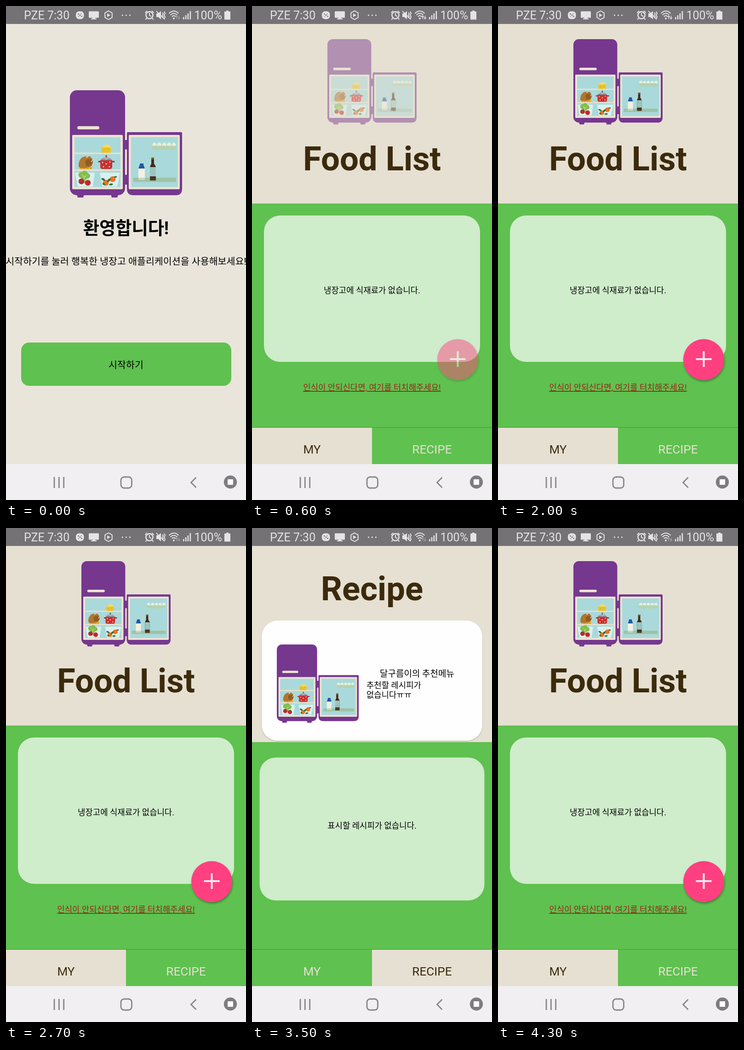
An HTML page for the animation above (5 s loop, 522 by 1073 pixels).

```html
<!DOCTYPE html>
<html lang="ko">
<head>
<meta charset="utf-8">
<title>Food List</title>
<style>
html, body { margin: 0; width: 100%; height: 100%; overflow: hidden; background: #e9e5da; }
svg { display: block; width: 522px; height: 1073px; }
text { font-family: Roboto, "Noto Sans CJK KR", "Noto Sans CJK", sans-serif; font-size: 17.8px; }
.mid { text-anchor: middle; }
.h1 { font-size: 72.5px; font-weight: 700; fill: #3b2a0c; }
.tab { font-size: 26.1px; }
.bar { font-size: 25px; fill: #e4e3e5; }
.link { fill: #96261a; text-decoration: underline; text-decoration-thickness: 1px; }

.welcome, .list, .recipe, .fade, .arrows { animation: 5s step-end infinite; }
.welcome { animation-name: welcome; }
.list { animation-name: list; }
.recipe { animation-name: recipe; }
.list .fade { animation-name: listFade; }
.recipe .fade { animation-name: recipeFade; }
.arrows { animation-name: arrows; }
@keyframes welcome { 0% { visibility: visible } 10%, 100% { visibility: hidden } }
@keyframes list { 0%, 64% { visibility: hidden } 10%, 80%, 100% { visibility: visible } }
@keyframes recipe { 0%, 80%, 100% { visibility: hidden } 64% { visibility: visible } }
@keyframes listFade {
  0%, 10%, 80% { opacity: .14 }
  12%, 82% { opacity: .47 }
  14%, 84% { opacity: .8 }
  16%, 86%, 100% { opacity: 1 }
  64% { opacity: .14 }
}
@keyframes recipeFade { 0%, 64% { opacity: .15 } 66% { opacity: .47 } 68% { opacity: .8 } 70%, 100% { opacity: 1 } }
@keyframes arrows { 0%, 54%, 100% { opacity: .4 } 10% { opacity: 1 } }
</style>
</head>
<body>
<svg viewBox="0 0 522 1073">
  <defs>
    <filter id="fabShadow" x="-20%" y="-20%" width="140%" height="150%">
      <feDropShadow dx="1" dy="3" stdDeviation="2" flood-color="#000" flood-opacity=".35"/>
    </filter>
    <filter id="cardShadow" x="-5%" y="-5%" width="110%" height="112%">
      <feDropShadow dx="0" dy="1" stdDeviation="1.2" flood-color="#000" flood-opacity=".28"/>
    </filter>
    <pattern id="label" width="3" height="3" patternUnits="userSpaceOnUse">
      <rect width="3" height="3" fill="#a9d3cc"/><circle cx="1.5" cy="1.5" r=".8" fill="#5e8f86"/>
    </pattern>

    <g id="fridge">
      <g fill="#76378f">
        <rect width="120" height="228" rx="15"/>
        <path d="M15 226h16l-2 7h-12zM89 226h16l-2 7h-12z"/>
        <path d="M126 91H242q2 0 2 2V214q0 14-14 14H138q-14 0-14-14V93q0-2 2-2z"/>
        <rect x="118" y="108" width="8" height="97"/>
      </g>
      <g fill="#ebe3d0">
        <rect x="16" y="78" width="48" height="7" rx="3.5"/>
        <rect x="120" y="128" width="4" height="56" rx="2"/>
        <rect x="5" y="97" width="110" height="118" rx="2"/>
        <rect x="128" y="97" width="111" height="118" rx="2"/>
      </g>
      <g fill="#aad9db">
        <rect x="10" y="102" width="100" height="33.5"/>
        <rect x="10" y="138.5" width="100" height="33.5"/>
        <rect x="10" y="175" width="100" height="35"/>
        <rect x="133" y="102" width="102" height="108"/>
      </g>

      <!-- cheese -->
      <path d="M68 124L80 117L89 122V136H68z" fill="#f5dc62"/>
      <path d="M68 124H89V136H68z" fill="#e9c52c"/>
      <g fill="#d3ab20"><circle cx="74" cy="130" r="1.6"/><circle cx="83" cy="128" r="1.3"/><circle cx="80" cy="133" r="1"/></g>

      <!-- roast -->
      <path d="M20 166h30l-3 6H22z" fill="#eab535"/>
      <path d="M19 166C18 152 26 142 37 144C43 140 47 147 50 151C51 160 47 168 39 168C30 170 22 170 19 166z" fill="#b1762f"/>
      <path d="M33 154C37 149 46 147 50 153C50 162 42 167 35 164z" fill="#935c24"/>
      <path d="M47 155L52 148M36 146L43 141" stroke="#e7d3ab" stroke-width="2" stroke-linecap="round"/>
      <path d="M22 169h3m4 1h3m5 0h3m4-1h3" stroke="#d88c2a" stroke-width="2"/>

      <!-- pot -->
      <path d="M66 152Q79 138 92 152z" fill="#7e94a0"/>
      <path d="M72 148L86 148M75 145L79 151M83 145L79 151" stroke="#c7dadd" stroke-width="1"/>
      <circle cx="79" cy="143" r="2" fill="#c9302f"/>
      <path d="M63 155h33" stroke="#9e2427" stroke-width="3" stroke-linecap="round"/>
      <path d="M66 152H92V166Q92 171 87 171H71Q66 171 66 166z" fill="#ca302f"/>
      <g fill="#f1d9c5">
        <circle cx="71" cy="157" r="1.4"/><circle cx="79" cy="160" r="1.6"/><circle cx="87" cy="156" r="1.4"/>
        <circle cx="73" cy="166" r="1.5"/><circle cx="86" cy="166" r="1.5"/>
      </g>

      <!-- drawers -->
      <path d="M11 179H54L50 209H17zM65 179H109L103 209H70z" fill="#d9f0ef"/>
      <g fill="#84bd4e">
        <circle cx="25" cy="184" r="6.5"/><circle cx="32" cy="181" r="6.5"/><circle cx="38" cy="186" r="6"/><circle cx="31" cy="189" r="6.5"/>
        <rect x="29" y="189" width="5" height="13"/>
      </g>
      <path d="M31 200V188L26 183M31 190L36 184" fill="none" stroke="#c4dc89" stroke-width="1.3"/>
      <g fill="#c6242b"><circle cx="25" cy="198" r="6.2"/><circle cx="39" cy="201" r="6.2"/></g>
      <g fill="#2e7b3c"><path d="M21 193l4 1.5 4-2-3 4zM35 196l4 1.5 4-2-3 4z"/></g>
      <g fill="#ef7322"><circle cx="78" cy="201" r="6.3"/><circle cx="93" cy="193" r="6.3"/></g>
      <g fill="#2f7136">
        <path d="M68 191q8-1 9 5q-7 2-9-5zM80 200q1-8 9-9q0 8-9 9zM95 188q4-3 8 0q-3 4-8 0zM84 205q6-5 10-1q-3 5-10 1zM70 203q5-4 7 2q-3 3-7-2z"/>
      </g>

      <!-- door contents -->
      <g fill="#ebefdb">
        <ellipse cx="184" cy="120" rx="4.6" ry="6.5"/><ellipse cx="194.5" cy="120" rx="4.6" ry="6.5"/>
        <ellipse cx="205" cy="120" rx="4.6" ry="6.5"/><ellipse cx="215.5" cy="120" rx="4.6" ry="6.5"/>
        <ellipse cx="226" cy="120" rx="4.6" ry="6.5"/>
      </g>
      <rect x="178" y="120.5" width="53" height="8.5" fill="#b4d3ae"/>
      <path d="M149 169L153 164H159L163 169V196H149z" fill="#f3f0e3"/>
      <path d="M152 159H160V162L163 170H149L152 162z" fill="#1f57a6"/>
      <path d="M177 146H183V160Q187 164 187 169V196H174V169Q174 164 177 160z" fill="#482719"/>
      <rect x="177" y="146" width="6" height="4" fill="#7a6324"/>
      <rect x="174" y="167" width="13" height="20" fill="url(#label)"/>
      <rect x="138" y="190" width="93" height="9" fill="#9bc3a0" opacity=".9"/>
      <path d="M149 190h14v5h-14z" fill="#c5d8c4"/>
      <path d="M174 190h13v6h-13z" fill="#513822"/>
    </g>
  </defs>

  <g class="welcome">
    <rect width="522" height="1000" fill="#e9e5da"/>
    <use href="#fridge" x="139" y="183"/>
    <text class="mid" x="261" y="496" style="font-size:38.3px;font-weight:700">환영합니다!</text>
    <text class="mid" x="261" y="561.5" style="font-size:20.6px">시작하기를 눌러 행복한 냉장고 애플리케이션을 사용해보세요!</text>
    <rect x="33" y="731" width="457" height="94" rx="17" fill="#5fc14f"/>
    <text class="mid" x="261" y="786.5" style="font-size:20.6px">시작하기</text>
  </g>

  <g class="list">
    <rect width="522" height="429" fill="#e6e0d2"/>
    <rect y="429" width="522" height="566" fill="#5fc14f"/>
    <g class="fade"><use href="#fridge" transform="translate(164 72) scale(.795)"/></g>
    <text class="mid h1" x="261" y="357">Food List</text>
    <rect x="26" y="455" width="470" height="318" rx="35" fill="#cfeccb"/>
    <text class="mid" x="261" y="624.3">냉장고에 식재료가 없습니다.</text>
    <text class="mid link" x="261" y="835">인식이 안되신다면, 여기를 터치해주세요!</text>
    <g class="fade">
      <circle cx="447.5" cy="768" r="44.5" fill="#ff3f80" filter="url(#fabShadow)"/>
      <path d="M430.5 767H464.5M447.5 750V784" stroke="#fbeff2" stroke-width="4"/>
    </g>
    <rect y="916" width="261" height="79" fill="#e6e0d2"/>
    <rect y="915" width="522" height="1" fill="#4d8f42"/>
    <text class="mid tab" x="130.5" y="971.5" fill="#3b2a0c">MY</text>
    <text class="mid tab" x="391.5" y="971.5" fill="#e6e0d2">RECIPE</text>
  </g>

  <g class="recipe">
    <rect width="522" height="465" fill="#e6e0d2"/>
    <rect y="465" width="522" height="530" fill="#5fc14f"/>
    <text class="mid h1" x="261" y="157">Recipe</text>
    <rect x="21" y="201" width="480" height="261" rx="35" fill="#fffeff" filter="url(#cardShadow)"/>
    <g class="fade"><use href="#fridge" transform="translate(54 253) scale(.73)"/></g>
    <text class="mid" x="359" y="322.5" style="font-size:19px">달구름이의 추천메뉴</text>
    <text x="249" y="348">추천할 레시피가</text>
    <text x="249" y="369">없습니다ㅠㅠ</text>
    <rect x="16.5" y="498.5" width="489" height="310.5" rx="35" fill="#cfeccb"/>
    <text class="mid" x="261" y="653">표시할 레시피가 없습니다.</text>
    <rect x="261" y="916" width="261" height="79" fill="#e6e0d2"/>
    <rect y="915" width="522" height="1" fill="#4d8f42"/>
    <text class="mid tab" x="130.5" y="971.5" fill="#e6e0d2">MY</text>
    <text class="mid tab" x="391.5" y="971.5" fill="#3b2a0c">RECIPE</text>
  </g>

  <!-- status bar -->
  <rect width="522" height="39" fill="#757276"/>
  <text class="bar" x="39" y="29">PZE</text>
  <text class="bar" x="90" y="29">7:30</text>
  <text class="bar" x="409.5" y="29">100%</text>
  <g fill="#e4e3e5">
    <rect x="152" y="11.5" width="17.5" height="17" rx="7"/>
    <rect x="180" y="11.5" width="22" height="14" rx="1.5"/>
    <path d="M188 25h6v2h3v2h-12v-2h3z"/>
    <path d="M220 16l7 4-7 4z"/>
    <circle cx="253.5" cy="20" r="1.6"/><circle cx="261.5" cy="20" r="1.6"/><circle cx="269.5" cy="20" r="1.6"/>
    <path d="M327 16h4l6-5v18l-6-5h-4z"/>
    <path d="M385 24h2.6v5H385zM389.8 20h2.6v9h-2.6zM394.6 16h2.6v13h-2.6zM399.6 11h2.6v18h-2.6z"/>
    <path d="M479 10h5v2h4v17.5h-13V12h4z"/>
  </g>
  <g fill="#757276"><circle cx="157.5" cy="17.5" r="1.4"/><circle cx="161" cy="20" r="1.4"/><circle cx="164.5" cy="22.5" r="1.4"/><circle cx="158" cy="22.5" r="1"/><circle cx="163.5" cy="17" r="1"/></g>
  <g fill="none" stroke="#e4e3e5" stroke-width="2">
    <path d="M223 10.5l7.8 4.6v9.8l-7.8 4.6-7.8-4.6v-9.8z" stroke-linejoin="round"/>
    <circle cx="312" cy="20" r="7.6" stroke-width="2.6"/>
    <path d="M312 15v5.5l4 2M302.500 15l4.500-4.500M321.500 15l-4.500-4.500M306 26.500l-2.500 3M318 26.500l2.500 3"/>
    <path d="M340 14l2 3-2 3 2 3-2 3M344 12l2 4-2 4 2 4-2 4"/>
    <path d="M354.500 16Q365 6 375.500 16M357.500 19.500Q365 12.500 372.500 19.500M360.800 23Q365 19 369.200 23"/>
  </g>
  <circle cx="365" cy="27" r="2" fill="#e4e3e5"/>
  <path class="arrows" d="M371.500 28.500V21.500M369.300 24l2.200-2.500 2.200 2.500M376.500 21V28M374.300 25.500l2.200 2.500 2.200-2.500" fill="none" stroke="#e4e3e5" stroke-width="1.5"/>
  <path d="M327 11L345 29" stroke="#e4e3e5" stroke-width="1.800"/>

  <!-- navigation bar -->
  <rect y="995" width="522" height="78" fill="#f1eff2"/>
  <g fill="none" stroke="#88868a" stroke-width="2.800">
    <path d="M105 1023V1047M115.300 1023V1047M125.700 1023V1047"/>
    <rect x="250" y="1023" width="23.500" height="24" rx="7"/>
    <path d="M413.500 1024L402.500 1035L413.500 1046"/>
  </g>
  <circle cx="488" cy="1034" r="14.200" fill="#7e7c80"/>
  <rect x="482" y="1028" width="12" height="12" rx="1" fill="#fff"/>
</svg>
</body>
</html>
```
